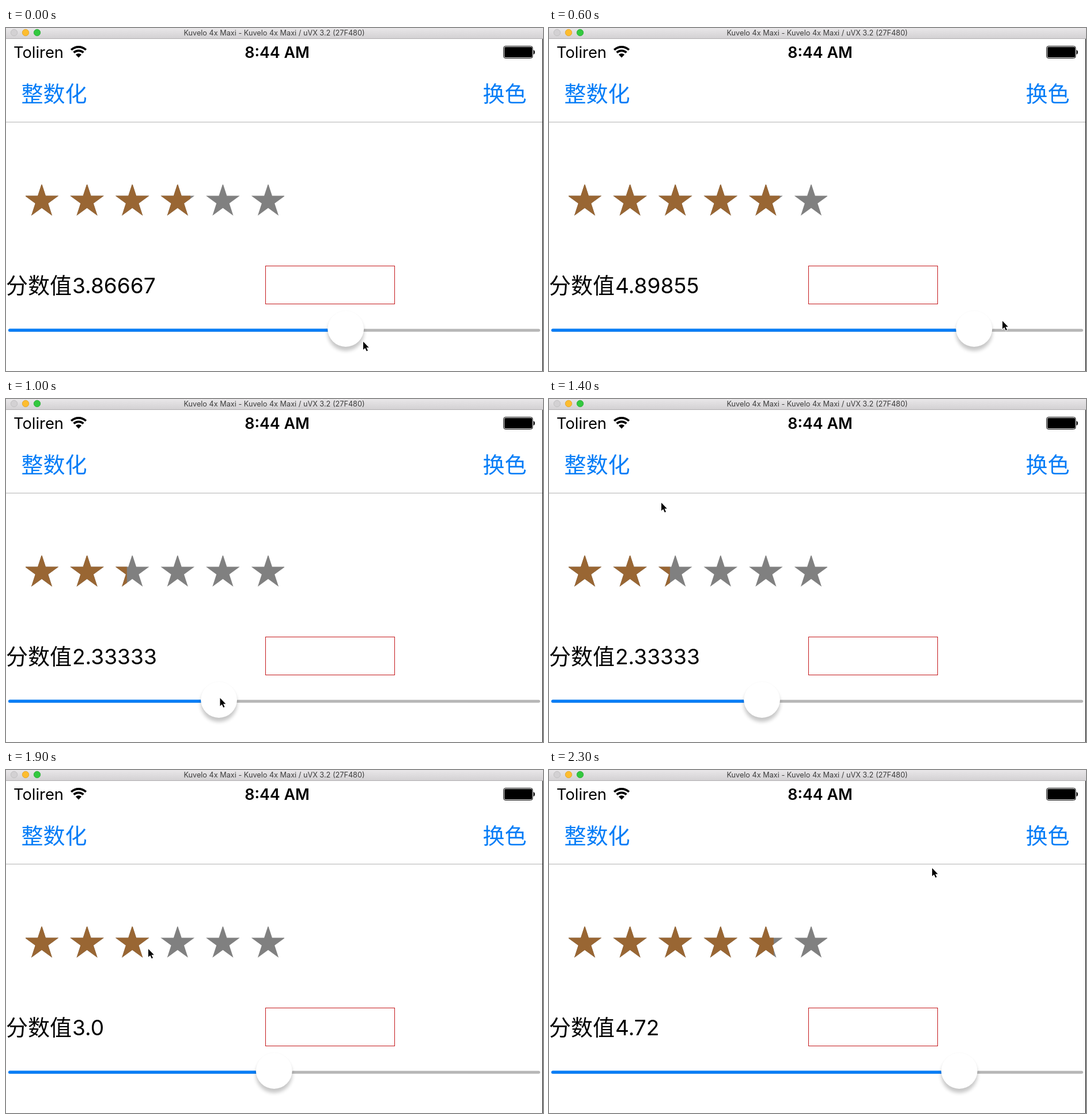
Animation, 932 px wide and 596 px high, one loop 2400 ms. Source, as an HTML page:

```html
<!DOCTYPE html>
<html lang="zh">
<head>
<meta charset="utf-8">
<title>Star rating</title>
<style>
html, body { margin: 0; width: 100%; height: 100%; overflow: hidden; background: #fff; }
svg { display: block; width: 932px; height: 596px; }
text { font-family: Inter, Roboto, sans-serif; white-space: pre; }
.cjk { font-family: "Noto Sans CJK SC", "Noto Sans CJK JP", "Noto Sans CJK", sans-serif; font-size: 38px; font-weight: 300; }
.link { fill: #067df7; }
</style>
</head>
<body>
<svg viewBox="0 0 932 596">
  <defs>
    <linearGradient id="bar" x2="0" y2="1">
      <stop stop-color="#e9e7e9"/><stop offset="1" stop-color="#d3d1d3"/>
    </linearGradient>
    <clipPath id="starBox"><rect x="34" y="272" width="449" height="54"/></clipPath>
    <clipPath id="fillBox"><rect id="fill" x="33" y="272" height="54"/></clipPath>
    <filter id="blur" x="-30%" y="-30%" width="160%" height="160%"><feGaussianBlur stdDeviation="3.4"/></filter>
    <path id="stars"/>
  </defs>
  <rect width="932" height="596" fill="#fff"/>

  <rect width="932" height="18" fill="url(#bar)"/>
  <path d="M0 18.5H932" stroke="#b0aeb0"/>
  <circle cx="14" cy="8" r="5.7" fill="#d3d1d3" stroke="#bdbbbd" stroke-width=".8"/>
  <circle cx="34" cy="8" r="5.7" fill="#fdbd2f" stroke="#dfa023" stroke-width=".8"/>
  <circle cx="54" cy="8" r="5.7" fill="#33c83f" stroke="#22a92f" stroke-width=".8"/>
  <text x="465.5" y="13" font-size="12.7" text-anchor="middle" fill="#3c3c3c">Kuvelo 4x Maxi - Kuvelo 4x Maxi / uVX 3.2 (27F480)</text>
  <path d="M931.5 19V596" stroke="#000"/>

  <text x="13" y="52" font-size="27.3">Toliren</text>
  <g id="wifi" fill="none" stroke="#000" stroke-width="3.7"></g>
  <text x="470.5" y="52" font-size="26.8" font-weight="600" text-anchor="middle">8:44 AM</text>
  <rect x="863.5" y="31.5" width="50.5" height="21" rx="3.5" fill="#fff" stroke="#000"/>
  <rect x="865" y="33" width="48" height="18" rx="2"/>
  <path d="M915.5 38q2.5 1 2.5 4t-2.5 4z"/>

  <text class="cjk link" x="26.5" y="127.5">整数化</text>
  <text class="cjk link" x="827.5" y="127.5">换色</text>
  <path d="M0 163.5H931" stroke="#b2b2b2"/>

  <g clip-path="url(#starBox)">
    <use href="#stars" fill="#808080"/>
    <use href="#stars" fill="#996633" clip-path="url(#fillBox)"/>
  </g>

  <text class="cjk" x="0" y="461">分数值</text>
  <text id="score" x="115" y="461" font-size="37.1"></text>
  <rect x="450.5" y="413.5" width="224" height="66" fill="none" stroke="#c4181c"/>

  <rect x="4" y="522.7" width="923" height="5" rx="2.5" fill="#b7b7b7"/>
  <rect id="track" x="4" y="522.5" height="5.2" rx="2.5" fill="#067df7"/>
  <g id="thumb">
    <circle cy="529.5" r="31.5" fill="#000" opacity=".22" filter="url(#blur)"/>
    <circle cy="522.5" r="31.5" fill="#fff" stroke="#000" stroke-opacity=".04" stroke-width=".6"/>
  </g>
  <path id="cursor" d="M0 0V14L3.2 11L5.8 16.6L8 15.6L5.4 10.2H9.8Z" stroke="#fff" stroke-width="1.6" paint-order="stroke"/>
</svg>
<script>
const LOOP = 2400, STEP = 100;
const STAR_X = 33, PITCH = 78.6, STAR_W = 59;
const $ = id => document.getElementById(id);
const polar = (cx, cy, r, a) => [cx + r * Math.sin(a), cy - r * Math.cos(a)].map(n => n.toFixed(2)).join(' ');

function starPath(cx, cy, r) {
  const points = Array.from({ length: 10 }, (_, k) => polar(cx, cy, k % 2 ? r * 0.382 : r, k * Math.PI / 5));
  return 'M' + points.join('L') + 'Z';
}
$('stars').setAttribute('d', Array.from({ length: 6 }, (_, i) => starPath(62 + PITCH * i, 301.1, 30.8)).join(''));

const arc = r => `M${polar(126, 51.5, r, -0.76)}A${r} ${r} 0 0 1 ${polar(126, 51.5, r, 0.76)}`;
$('wifi').innerHTML = `<path d="${arc(18.6)}"/><path d="${arc(12.2)}"/><path d="${arc(7.3)}L126 51.5Z" fill="#000" stroke="none"/>`;

// [time, x, y] of the pointer tip
const pointer = [
  [0, 620, 545], [400, 67, 529], [600, 787, 509], [1000, 371.5, 519.5], [1300, 85, 118],
  [1600, 415, 305], [1900, 247, 311], [2000, 90, 118], [2200, 389, 305], [2300, 665, 170.5]
];
// [time, score] while the slider is dragged
const drag = [[0, 3.86667], [400, 0.362319], [600, 4.89855], [1000, 2.33333]];

function sample(keys, t, column) {
  const next = keys.findIndex(key => key[0] > t);
  if (next < 0) return keys[keys.length - 1][column];
  const a = keys[next - 1], b = keys[next];
  const p = (t - a[0]) / (b[0] - a[0]);
  return a[column] + (b[column] - a[column]) * p;
}

function scoreAt(t, x) {
  if (t < 1500) return Math.round(sample(drag, t, 1) * 345) / 345;
  if (t < 1600) return 5;
  if (t <= 1900) return Math.ceil((x - STAR_X) / PITCH);
  return t < 2200 ? 3 : 4.72;
}

function format(score) {
  return Number.isInteger(score) ? score.toFixed(1) : String(+score.toPrecision(6));
}

function draw(t) {
  const x = sample(pointer, t, 1), y = sample(pointer, t, 2);
  const score = scoreAt(t, x), whole = Math.floor(score);
  const thumbX = 34.6 + 143.55 * score;
  $('score').textContent = format(score);
  $('fill').setAttribute('width', whole * PITCH + (score - whole) * STAR_W);
  $('track').setAttribute('width', thumbX - 4);
  $('thumb').setAttribute('transform', `translate(${thumbX})`);
  $('cursor').setAttribute('transform', `translate(${x} ${y})`);
}

const start = performance.now();
function tick() {
  const t = (performance.now() - start) % LOOP;
  draw(Math.floor(t / STEP) * STEP);
  requestAnimationFrame(tick);
}
tick();
</script>
</body>
</html>
```
